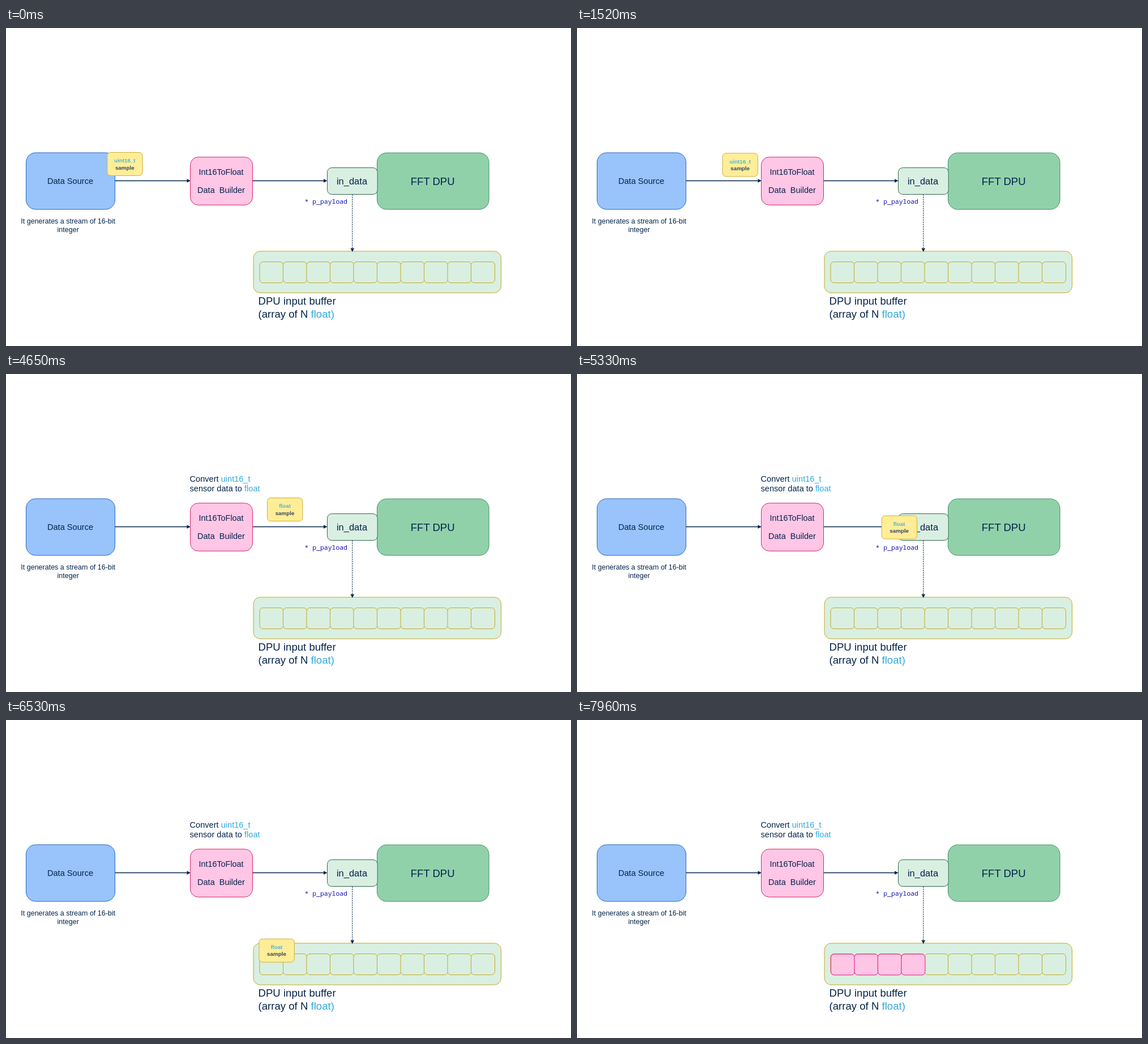
Animation, 998 px wide and 561 px high, one loop 8000 ms. Source, as an HTML page:

```html
<!DOCTYPE html>
<html lang="en">
<head>
<meta charset="utf-8">
<title>Data stream into a buffer</title>
<style>
  html, body { margin: 0; width: 100%; height: 100%; overflow: hidden; background: #fff; }
  svg { display: block; width: 998px; height: 561px; }
  text { font-family: "Liberation Sans", Arial, sans-serif; fill: #03234b; }
  .mid { text-anchor: middle; }
  .type { fill: #2fa9df; }
  .code { font-family: "Noto Sans Mono", "Liberation Mono", monospace; fill: #1010b4; }
  .line { stroke: #03234b; fill: none; }
  .head { fill: #03234b; }
  .buffer { fill: #d9efe1; stroke: #c3aa27; }
  .full { fill: #ffc5e4; stroke: #e3148a; }
  #sample text { font-weight: bold; font-size: 9.8px; fill: #36455f; }
  #sample .type { fill: #4db4dc; }
</style>
</head>
<body>
<svg viewBox="0 0 998 561">
  <rect x="35.5" y="220" width="157" height="100" rx="17" fill="#98c3fb" stroke="#2468bd"/>
  <text class="mid" x="113.5" y="275" font-size="14.6">Data Source</text>
  <text class="mid" x="109.7" y="345" font-size="12.5">It generates a stream of 16-bit</text>
  <text class="mid" x="109.7" y="360" font-size="12.5">integer</text>

  <path class="line" stroke-width="1.7" d="M192.5 269.5H321M435.5 269.5H563"/>
  <path class="head" d="M319.5 266.3L326 269.5L319.5 272.7ZM561 266.3L567.5 269.5L561 272.7Z"/>

  <rect x="325.5" y="227.8" width="110" height="84.5" rx="14" fill="#ffc6e6" stroke="#d4246f"/>
  <text class="mid" x="380" y="258.5" font-size="14.4">Int16ToFloat</text>
  <text class="mid" x="380" y="290.5" font-size="14.5">Data&nbsp; Builder</text>
  <g id="note" font-size="14.6">
    <text x="324.5" y="189.5">Convert <tspan class="type">uint16_t</tspan></text>
    <text x="324.5" y="207.3">sensor data to <tspan class="type">float</tspan></text>
  </g>

  <rect x="655.5" y="220.2" width="197.5" height="99.8" rx="17" fill="#91d1aa" stroke="#3a8f62"/>
  <text class="mid" x="753.7" y="276.7" font-size="18.5">FFT DPU</text>
  <rect x="567.5" y="246.5" width="88.7" height="47" rx="8" fill="#d9efe1" stroke="#2c6b50"/>
  <text class="mid" x="611" y="275.6" font-size="16.5">in_data</text>
  <text class="code" x="527.5" y="310.3" font-size="11.45">* p_payload</text>

  <rect class="buffer" x="437" y="393.8" width="437.5" height="73.4" rx="12"/>
  <g id="cells"></g>
  <path class="line" stroke-dasharray="2.5 1.5" d="M611.8 293.5V389"/>
  <path class="head" d="M608.5 388.5H615.1L611.8 395Z"/>
  <text x="445.5" y="488" font-size="18.6">DPU input buffer</text>
  <text x="445.5" y="510.5" font-size="18.6">(array of N <tspan class="type">float)</tspan></text>

  <g id="sample">
    <rect width="62.3" height="41" rx="6" fill="#ffee97" stroke="#cfae36"/>
    <text id="kind" class="mid type" x="31" y="17.8"></text>
    <text class="mid" x="31" y="30.2">sample</text>
  </g>
</svg>
<script>
const LOOP = 8000;
const $ = id => document.getElementById(id);
const [note, sample, kind, cells] = ['note', 'sample', 'kind', 'cells'].map($);

const addCell = (i, name, shift) => {
  const cell = document.createElementNS('http://www.w3.org/2000/svg', 'rect');
  const attrs = { class: name, x: 448 + 41.5 * i + shift, y: 412.5 + shift, width: 42, height: 37, rx: 6 };
  for (const key in attrs) cell.setAttribute(key, attrs[key]);
  return cells.appendChild(cell);
};
for (let i = 0; i < 10; i++) addCell(i, 'buffer', 0);
const filled = [7050, 7340, 7630, 7960].map((at, i) => ({ at, cell: addCell(i, 'full', 0.4) }));

// Each trip: visible span, label, corner points, and [time, distance travelled] keys.
const trips = [
  { from: 0, to: 2080, label: 'uint16_t',
    path: [[178.8, 219.5], [262.3, 221]],
    keys: [[60, 0], [840, 29.5], [1520, 78.3], [1680, 82], [1960, 83.5]] },
  { from: 4130, to: 7050, label: 'float',
    path: [[443.5, 218.6], [538.2, 218.6], [538.2, 295], [441, 392.2]],
    keys: [[4170, 0], [4650, 18], [4930, 57], [5330, 126], [5770, 203.5], [6530, 300], [6610, 304], [6900, 308.6]] }
];

// Monotone cubic interpolation, at rest at both ends.
function distance(keys, t) {
  const last = keys.length - 1;
  if (t <= keys[0][0]) return 0;
  if (t >= keys[last][0]) return keys[last][1];
  const secant = i => (keys[i + 1][1] - keys[i][1]) / (keys[i + 1][0] - keys[i][0]);
  const slope = i => {
    if (i === 0 || i === last) return 0;
    const a = secant(i - 1), b = secant(i);
    return 2 * a * b / (a + b);
  };
  const i = keys.findIndex((k, n) => t < keys[n + 1][0]);
  const [t0, d0] = keys[i], [t1, d1] = keys[i + 1];
  const h = t1 - t0, u = (t - t0) / h, v = 1 - u;
  return d0 * v * v * (1 + 2 * u) + d1 * u * u * (3 - 2 * u)
    + h * u * v * (slope(i) * v - slope(i + 1) * u);
}

function pointAt(path, d) {
  for (let i = 1; i < path.length; i++) {
    const [x0, y0] = path[i - 1], [x1, y1] = path[i];
    const len = Math.hypot(x1 - x0, y1 - y0);
    if (d <= len) return [x0 + (x1 - x0) * d / len, y0 + (y1 - y0) * d / len];
    d -= len;
  }
  return path[path.length - 1];
}

const show = (el, on) => { el.style.display = on ? '' : 'none'; };

function draw(t) {
  const trip = trips.find(p => t >= p.from && t < p.to);
  show(sample, trip);
  if (trip) {
    kind.textContent = trip.label;
    sample.setAttribute('transform', `translate(${pointAt(trip.path, distance(trip.keys, t))})`);
  }
  show(note, t >= 3080);
  filled.forEach(f => show(f.cell, t >= f.at));
}

const start = performance.now();
function tick() {
  draw((performance.now() - start) % LOOP);
  requestAnimationFrame(tick);
}
tick();
</script>
</body>
</html>
```
